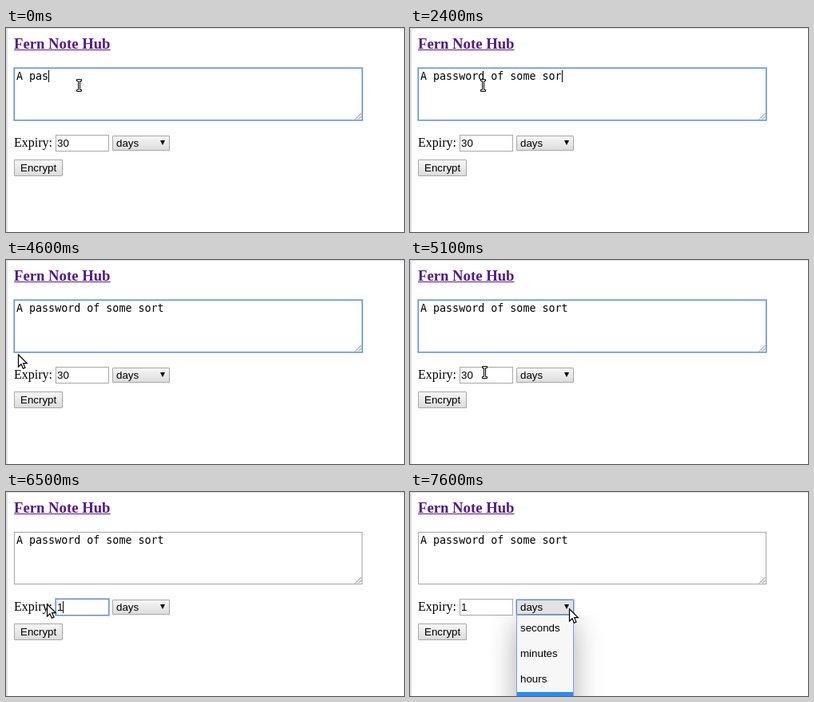
An HTML page that plays this animation: 498x256 px, repeating every 8000 ms.

```html
<!DOCTYPE html>
<html lang="en">
<head>
<meta charset="utf-8">
<title>Secret form</title>
<style>
  html, body { margin: 0; width: 100%; height: 100%; overflow: hidden; background: #fff; }
  body { position: relative; font: 13.333px/15px "Liberation Sans", sans-serif; color: #000; }
  body > * { position: absolute; box-sizing: border-box; white-space: pre; }
  #edge { inset: 0; border: solid #dcdde6; border-width: 1px 0 0 2px; }
  #title { left: 10px; top: 9px; font: bold 18.72px/21px "Liberation Serif", serif;
    color: #551a8b; text-decoration: underline; }
  #label { left: 10px; top: 135px; font: 16px/17px "Liberation Serif", serif; }
  .box { border: 1px solid #a6a6a6; }
  .button { background: linear-gradient(#f7f7f7, #dcdcdc); border-radius: 1px; }
  .focus { border-color: #5e8fd8; box-shadow: 0 0 0 1px #a9c5ef; }
  #area { left: 10px; top: 50px; width: 436px; height: 66px; padding: 2px;
    font-family: "DejaVu Sans Mono", monospace; }
  #count { left: 62px; top: 134px; width: 67px; height: 21px; padding: 2px 1px; }
  #unit { left: 133px; top: 135px; width: 72px; height: 19px; padding: 1px 4px; }
  #unit.open { background: #e2e2e2; }
  #send { left: 10px; top: 165px; width: 61px; height: 21px; padding: 2px 7px; }
  .picked { background: #1e90ff; color: #fff; }
  #list { left: 133px; top: 154px; width: 72px; height: 130px; padding-left: 4px;
    border: 1px solid #7d9fd8; line-height: 32px; clip-path: inset(0 -99px);
    background: linear-gradient(#f7f7f7 96px, #1e90ff 0); box-shadow: 0 10px 36px #0005; }
  #caret { width: 1px; height: 15px; background: #000; }
  svg { left: 0; top: 0; }
</style>
</head>
<body>
<div id="edge"></div>
<div id="title">Fern Note Hub</div>
<div id="area" class="box"></div>
<div id="label">Expiry:</div>
<div id="count" class="box"><span id="tens"></span><span id="ones"></span></div>
<div id="unit" class="box button">days</div>
<div id="send" class="box button">Encrypt</div>
<svg width="498" height="256">
  <path d="M437 114.5L444.5 107M441 114.5L444.5 111" stroke="#777"/>
  <path d="M193 141H199L196 147z"/>
</svg>
<div id="list">seconds
minutes
hours</div>
<div id="caret"></div>
<svg width="498" height="256" fill="#fff" stroke="#000">
  <path id="beam" d="M-2.5-7.5H3.5V-5.5H1.5V5.5H3.5V7.5H-2.5V5.5H-.5V-5.5H-2.5z"/>
  <path id="arrow" d="M.5.8V16L4 12.7L6.4 18.2L9 17.1L6.6 11.7H11.3z" stroke-width="1.2"/>
</svg>
<script>
const LOOP = 8000, STEP = 100, BLINK = 600;
const FOCUS_COUNT = 5200, DRAG = 5400, RETYPE = 6500, FOCUS_UNIT = 7400, OPEN = 7500;
const phrase = 'A password of some sort';
const $ = id => document.getElementById(id);
const show = (id, on) => $(id).style.visibility = on ? 'visible' : 'hidden';
const inside = (x, y, l, t, r, b) => x >= l && x <= r && y >= t && y <= b;

// Steady typing after a short pause, with the last letter late.
function typedCount(t) {
  if (t < 500) return t < 100 ? 5 : 6;
  return t < 4000 ? Math.min(22, Math.floor(7 + (t - 500) * 0.0079)) : 23;
}

// Pointer stops: [time, x, y]
const stops = [[0, 91, 72], [4300, 91, 72], [4700, 1, 127], [5100, 93, 141],
  [5300, 93, 141], [5800, 51, 140], [6700, 51, 140], [7100, 199, 146], [LOOP, 199, 146]];

function pointerAt(t) {
  const i = stops.findIndex(s => s[0] > t);
  const [t0, x0, y0] = stops[i - 1], [t1, x1, y1] = stops[i];
  const p = (t - t0) / (t1 - t0), e = p * p * (3 - 2 * p);
  return [Math.round(x0 + (x1 - x0) * e), Math.round(y0 + (y1 - y0) * e)];
}

function draw(t) {
  const n = typedCount(t), [x, y] = pointerAt(t);
  const focus = t < FOCUS_COUNT ? 'area' : t < FOCUS_UNIT ? 'count' : 'unit';
  for (const id of ['area', 'count', 'unit']) $(id).classList.toggle('focus', id === focus);
  $('unit').classList.toggle('open', t >= OPEN);
  $('list').style.opacity = Math.max(0, Math.min(1, (t - OPEN + STEP) / (2 * STEP)));
  $('area').textContent = phrase.slice(0, n);

  // Dragging left picks the digits, then typing replaces them.
  const replaced = t >= RETYPE, dragging = t >= DRAG && !replaced;
  $('tens').textContent = replaced ? '1' : '3';
  $('ones').textContent = replaced ? '' : '0';
  $('tens').className = dragging && x < 68 ? 'picked' : '';
  $('ones').className = dragging && x < 76 ? 'picked' : '';

  const inArea = focus === 'area';
  const since = !inArea ? (replaced ? RETYPE : FOCUS_COUNT) : t < 2400 ? t : t < 4000 ? 2400 : 4000;
  const lit = Math.floor((t - since) / BLINK) % 2 === 0;
  show('caret', lit && focus !== 'unit' && !dragging);
  $('caret').style.left = (inArea ? Math.round(12.95 + 8.027 * n) : replaced ? 71 : 78) + 'px';
  $('caret').style.top = (inArea ? 53 : 137) + 'px';

  const overText = inside(x, y, 10, 50, 446, 116) || inside(x, y, 62, 134, 129, 155);
  show('beam', overText);
  show('arrow', !overText);
  for (const id of ['beam', 'arrow']) $(id).setAttribute('transform', `translate(${x} ${y})`);
}

function tick() {
  const t = performance.now() % LOOP;
  draw(t - t % STEP);
  requestAnimationFrame(tick);
}
tick();
</script>
</body>
</html>
```
